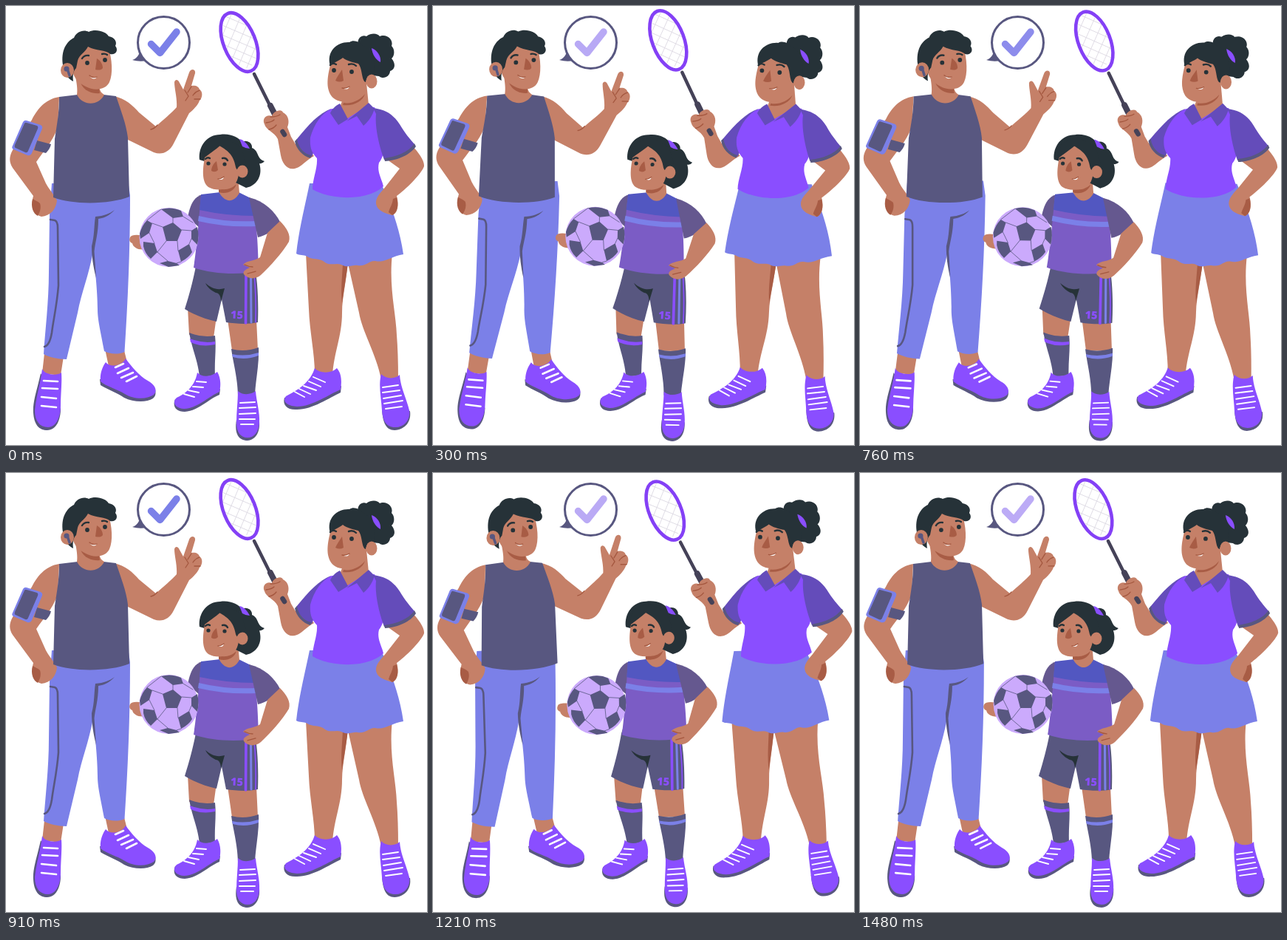
An HTML page for the animation above (1.51 s loop, 570 by 594 pixels).

```html
<!DOCTYPE html>
<html lang="en">
<head>
<meta charset="utf-8">
<title>Sport family</title>
<style>
html, body { margin: 0; width: 100%; height: 100%; overflow: hidden; background: #fff; }
svg { display: block; width: 570px; height: 594px; }
.skin { fill: #c58068; }
.shade { fill: #a85c45; }
.hair { fill: #263238; }
.slate { fill: #585780; }
.violet { fill: #8a4eff; }
.blue { fill: #7b80e8; }
.plum { fill: #644cba; }
.lilac { fill: #cbaafc; }
.line { fill: none; stroke-linecap: round; stroke-linejoin: round; }
.lace { stroke: #fff; stroke-width: 2.6; }
.thin { stroke-width: 1.9; }
.crease { stroke: #a4573f; stroke-width: 1.3; }
.brow { stroke: #263238; stroke-width: 2.4; }
.seam { stroke: #585780; stroke-width: .8; }
</style>
</head>
<body>
<svg viewBox="0 0 570 594">
  <g id="bubble">
    <path class="slate" d="M171,73 C177,71 179,67 181,63 L190,74 C184,75 178,75 171,73Z"/>
    <circle cx="213.500" cy="49.500" r="35" fill="#fff" stroke="#585780" stroke-width="3"/>
    <path id="tick" class="line" stroke-width="9.500" d="M196.500,51.500 L208.500,63.500 L231,35"/>
  </g>

  <g id="manLegs">
    <path class="skin" d="M52,470 L78,474 L74,500 L49,497Z M134,464 L160,466 L164,482 L140,492Z"/>
    <path class="blue" d="M62,240 L165,236 L168,256 C168,330 165,400 160.500,468 C152,472 140,471 133,467 C128,440 124,425 124,410 C124,385 120,350 118,332 C112,365 102,388 97,415 L82,478 C70,478 58,475 51,471 C53,440 58,400 58,360 L59,283Z"/>
    <path class="line" stroke="#585780" stroke-width="2.600" d="M60,289 L66,290 C69,291 70,294 70,300 L71,378 C69,405 64,425 62,442 C60,454 56,460 52,461"/>
    <path class="slate" d="M147,276 C139,285 131,287 125,288 C125,308 121,318 119.500,332 L122,368 C118,352 116,338 116,325 C120,310 119,298 121,285 C133,284 140,281 147,276Z"/>
    <path class="slate" d="M47,497 C42,520 36,535 37,550 C38,567 45,574 56,574 C68,574 74,560 74,545Z"/>
    <path class="violet" d="M49,491 C52,499 69,501 75,496 C76,510 74,525 74,541 C74,556 68,570 57,570 C46,570 39,562 39,547 C41,527 47,510 49,491Z"/>
    <path class="line lace" d="M51,507 L70,508 M49,517 L70,518 M48,529 L68,531 M48,541 L68,543"/>
    <path class="slate" d="M127,505 L128,513 C138,519 150,523 160,530 C172,536 190,537 199,531 C203,528 203,523 202,519Z"/>
    <path class="violet" d="M135,482 C141,490 157,487 162,477 C170,488 180,500 192,507 C203,513 205,521 200,526 C190,533 172,532 161,525 C150,518 136,515 128,508 C127,498 130,489 135,482Z"/>
    <path class="line lace" d="M148,489 L159,484 M151,497 L166,490 M156,503 L172,496 M163,508 L177,501"/>
  </g>

  <g id="manTop">
    <path class="skin" d="M72,123 C53,126 42,140 35,154 L9,195 C4,204 4,211 9,219 L37,257 C33,272 38,283 48,285 C60,284 68,275 69,263 C65,255 58,248 54,240 L41,211 C52,195 62,185 70,165Z"/>
    <path class="shade" d="M36,261 C33,272 37,281 43,284 C46,279 48,273 46,267 C43,264 39,263 36,261Z"/>
    <path class="slate" d="M42,182 L61,187 C60,192 57,196 54,199 L38,195Z"/>
    <path class="blue" d="M28,155 L47,161 Q50,163 49,166 L35,199 Q33,203 29,202 L10,194 Q7,192 9,189 L23,157 Q25,154 28,155Z"/>
    <path class="slate" d="M28,158 L42,162 Q44,163 43,166 L30,196 Q29,199 26,198 L13,192 Q11,191 12,188 L25,159 Q26,157 28,158Z"/>
    <path class="skin" d="M146,122 C162,125 172,135 180,144 L203,163 C214,153 224,145 231,137 C232,125 228,112 228,103 C229,99 233,99 235,104 L240,113 L248,90 C250,84 257,85 256,91 L251,108 C257,107 261,109 262,113 C267,116 266,124 262,128 C260,134 254,140 248,145 L227,186 C221,198 211,202 200,198 L163,180Z"/>
    <path class="line crease" d="M196,167 Q201,166 205,161 M242,114 L247,122 L243,128 M251,109 L246,117 M262,114 Q256,116 253,121 M263,126 L255,126"/>
    <path class="slate" d="M72,123 L97,120 L132,120 L149,122 C155,140 163,160 165,178 L167,258 C140,269 90,269 64,259 L66,180 C69,160 72,145 72,123Z"/>
    <path class="skin" d="M93,90 C96,105 97,113 96,120 C104,136 126,135 133,120 C128,117 127,114 126,108Z"/>
    <path class="shade" d="M101,104 C106,116 118,119 127,118 L126,111Z"/>
    <path class="skin" d="M90,72 C92,58 100,50 120,50 L138,54 C144,72 145,92 140,103 C135,114 119,115 108,109 C98,104 90,96 90,85Z"/>
    <path class="hair" d="M77,80 C74,60 82,48 92,43 C95,35 105,31 112,35 C122,30 136,35 139,41 C147,42 151,49 148,54 C153,60 148,67 141,65 C135,59 122,61 111,55 C107,63 99,66 97,74 L95,84 C91,88 90,94 91,102 C83,98 78,90 77,80Z"/>
    <ellipse class="skin" cx="83" cy="87" rx="9" ry="10"/>
    <path class="line" stroke="#585780" stroke-width="3.500" d="M83,85 L86,94"/>
    <circle class="slate" cx="82" cy="85" r="3.600"/>
    <circle class="hair" cx="110" cy="77" r="2.900"/><circle class="hair" cx="134" cy="73" r="2.900"/>
    <path class="line brow" d="M103,71 Q106,66 112,67 M130,65 Q134,64 137,66"/>
    <path class="shade" d="M123,71 C128,74 131,79 131,84 C129,87 125,87 121,86Z"/>
    <path fill="#fff" d="M113,94 C117,97 120,97 123,96 C122,99 116,100 113,94Z"/>
    <path class="line crease" d="M113,94 Q117,98 123,96"/>
  </g>

  <g id="kidLegs">
    <path class="skin" d="M246,408 L285,420 L281,449 L248,445Z M300,424 L339,424 L341,466 L306,466Z"/>
    <path class="slate" d="M248,442 Q265,449 283,446 C285,465 282,480 283,500 L262,502 C260,480 252,465 248,442Z M305,464 Q323,469 342,462 C343,485 338,505 337,526 L314,526 C313,500 308,485 305,464Z"/>
    <path class="violet" d="M249,450 Q266,457 283,454 L283,458 Q265,462 250,455Z"/>
    <path class="blue" d="M306,471 Q324,475 342,469 L342,473 Q324,480 307,475Z"/>
    <path class="slate" d="M229,532 C225,542 230,549 242,549 C260,548 274,532 289,526 L290,518Z"/>
    <path class="violet" d="M259,496 C265,503 278,502 286,495 C291,503 291,514 289,522 C275,528 258,545 241,545 C228,544 225,536 231,530 C244,524 256,514 259,496Z"/>
    <path class="line lace thin" d="M258,508 L271,509 M253,515 L267,516 M247,520 L261,523 M241,525 L255,529"/>
    <path class="slate" d="M312,560 C309,579 315,588 327,588 C338,587 344,577 343,562Z"/>
    <path class="violet" d="M314,521 C320,527 332,526 338,521 C339,535 344,550 343,564 C342,577 336,584 327,584 C317,584 312,576 312,564 C312,550 314,535 314,521Z"/>
    <path class="line lace thin" d="M317,537 L337,536 M316,544 L338,543 M316,552 L338,551 M316,559 L337,559 M318,566 L335,566"/>
    <path class="slate" d="M260,343 L335,343 C341,370 342,400 341,428 C328,431 311,430 298,428 L292,397 L285,427 C270,424 255,418 242,410 C249,388 254,368 257,352Z"/>
    <path class="hair" d="M270,375 C278,382 286,385 296,382 L291,400 C291,392 288,388 284,388 C278,385 273,381 270,375Z"/>
    <path class="line" stroke-linecap="butt" stroke="#8a4eff" stroke-width="3.600" d="M325,360 L324.500,429"/>
    <path class="line" stroke="#7b80e8" stroke-width="3" d="M331.500,360 L332,428"/>
    <path class="line" stroke="#8a4eff" stroke-width="1.600" d="M336,362 Q339,395 338,428"/>
    <text class="violet" x="304" y="423" font-family="'Open Sans', sans-serif" font-weight="800" font-size="14.500" transform="rotate(3 312 418)">15</text>
  </g>

  <g id="kidTop">
    <path class="skin" d="M190,312 C180,309 170,309 168,313 C166,317 168,320 171,321 C172,327 180,331 190,329Z"/>
    <path fill="#65588f" d="M266,255 C254,258 249,270 246,286 L262,300Z"/>
    <path fill="#7b5cc5" d="M264,256 L290,253 L315,253 L331,260 C338,275 341,310 342,359 C316,364 280,363 254,354 C258,330 261,290 264,256Z"/>
    <path fill="#5257c1" d="M264,255 L290,252 L315,252 L331,260 L337,284 Q298,284 262,276Z"/>
    <path class="blue" d="M261,284 Q298,293 338,291 L339,298 Q298,300 260,291Z"/>
    <path fill="#65588f" d="M329,259 C350,264 364,278 371,292 C362,304 351,311 341,313Z"/>
    <path class="skin" d="M371,291 C380,300 386,310 383,319 C374,334 358,352 345,364 C338,370 328,370 322,363 C320,358 326,356 330,354 L321,350 C326,344 338,345 344,340 L354,307Z"/>
    <path class="line crease" d="M334,353 Q329,353 323,350 M338,359 L327,362"/>
    <g id="ball">
      <circle class="lilac" cx="220.500" cy="313" r="40"/>
      <path class="slate" d="M212,299 L226,293 L238,303 L232,318 L217,318Z M210,275 Q224,271 237,277 L240,285 L226,287Z M181,308 Q184,297 191,290 L198,294 L194,307 L182,315Z M186,319 L201,321 L205,333 L196,342 Q188,335 186,325Z M233,331 L248,322 L252,333 Q247,341 237,346Z M220,353 L208,348 L219,345 L231,348 L235,351Z M259,299 L251,304 L251,315 L259,323 Q262,311 259,299Z"/>
      <path class="line seam" d="M226,293 L226,287 M212,299 L198,294 M217,318 L205,333 M232,318 L233,331 M238,303 L251,304 M240,285 L253,293 M210,275 L191,290 M251,315 L248,322 M205,333 L219,345 M237,346 L231,348 M194,307 L201,321"/>
    </g>
    <path class="skin" d="M288,238 L289,253 C297,267 309,266 316,253 L314,230Z"/>
    <path class="shade" d="M288,247 C297,250 306,247 312,241 C309,251 298,255 288,252Z"/>
    <path class="hair" d="M262,208 C260,190 272,174 290,174 C304,172 315,178 319,184 C328,180 334,187 333,192 C343,196 339,207 350,210 Q347,214 343,213 C348,229 340,243 325,246 L309,238 L285,215Z"/>
    <path class="skin" d="M269,205 C266,222 265,238 274,245 C286,252 305,248 312,238 C318,226 316,208 309,200 L291,188 C283,195 275,200 269,205Z"/>
    <path class="hair" d="M266,206 C275,200 282,196 287,188 C299,195 308,200 311,218 C313,224 316,222 317,216 L325,212 L318,190 L292,176 L272,186Z"/>
    <ellipse class="skin" cx="320" cy="224" rx="7.500" ry="8.500"/>
    <path class="violet" d="M316,180 C322,181 327,187 330,193 Q325,193 320,190Z"/>
    <circle class="hair" cx="274" cy="213" r="2.600"/><circle class="hair" cx="296" cy="214" r="2.600"/>
    <path class="line brow" d="M270,207 Q273,204 276,206 M293,206 Q298,205 300,209"/>
    <path class="shade" d="M285,210 C281,213 278,218 278,223 Q283,226 287,222Z"/>
    <path fill="#fff" d="M287,234 Q291,234 295,231 Q294,237 287,234Z"/>
    <path class="line crease" d="M287,234 Q291,234 295,231"/>
  </g>

  <g id="womanLegs">
    <path class="skin" d="M406,335 L463,335 C463,365 455,392 455,415 C455,447 444,468 442,500 L418,497 C418,470 411,440 410,410Z"/>
    <path class="skin" d="M460,335 L523,335 C518,380 528,415 529,445 Q531,470 531,505 L508,505 C501,470 482,440 478,415Z"/>
    <path class="shade" d="M456,349 L463,349 C460,370 457,388 455,402 C453,385 455,368 456,349Z"/>
    <path class="slate" d="M377,530 C374,540 381,547 394,546 C415,546 438,530 453,523 L454,514Z"/>
    <path class="violet" d="M418,490 C424,497 440,498 448,490 C454,497 455,507 453,519 C438,525 415,542 394,542 C380,541 374,535 379,528 C394,520 412,510 418,490Z"/>
    <path class="line lace thin" d="M416,502 L432,509 M410,508 L426,515 M403,514 L420,520 M397,518 L412,525 M391,522 L404,529"/>
    <path class="slate" d="M509,545 C510,563 514,574 526,574 C541,573 549,562 547,548Z"/>
    <path class="violet" d="M508,498 C514,505 527,505 533,499 C534,516 542,530 546,547 C548,559 540,570 527,570 C514,570 510,560 509,547 C508,530 504,513 508,498Z"/>
    <path class="line lace thin" d="M510,516 L531,513 M510,523 L533,520 M511,531 L535,527 M512,538 L537,534 M514,545 L536,542"/>
    <path class="blue" d="M411,240 C405,270 397,300 393,335 C398,338 402,336 408,339 C415,344 424,340 432,347 C440,352 447,347 454,350 C462,355 470,350 476,351 C488,353 491,344 500,345 C513,348 520,339 538,336 C533,300 521,270 508,240Z"/>
  </g>

  <g id="womanTop">
    <g transform="rotate(-22 316 49)">
      <path class="line" stroke="#dcd8e2" stroke-width=".8" d="M297,30 L334,67 M296,45 L331,80 M299,63 L320,84 M304,20 L337,53 M312,10 L335,33 M335,30 L298,67 M336,45 L302,79 M337,60 L312,85 M328,20 L296,52 M320,10 L297,33"/>
      <ellipse cx="316" cy="49" rx="21.500" ry="42" fill="none" stroke="#8440f6" stroke-width="4.600"/>
    </g>
    <path class="line" stroke="#454258" stroke-width="4.500" d="M336,92 L358,136"/>
    <path class="line" stroke="#454258" stroke-width="8" d="M358,135 L376,170"/>
    <path class="skin" d="M350,160 C346,152 353,146 360,149 C361,143 373,138 375,144 C383,148 384,157 381,164 L386,177 L392,187 L398,180 L417,203 C406,209 400,217 394,219 C382,224 374,214 372,202 L368,180 C363,170 352,168 350,160Z"/>
    <path class="line" stroke="#454258" stroke-width="6.500" d="M374.500,170 L377,174"/>
    <path class="line crease" d="M352,158 Q360,157 363,154 M358,150 Q367,150 371,147 M356,167 Q362,166 366,161"/>
    <path class="plum" d="M440,139 C424,145 410,160 393,181 C396,193 405,201 414,204 L428,170Z"/>
    <path class="slate" d="M394,180 C396,193 405,201 414,202 L412,206 C402,203 393,194 391,183Z"/>
    <path class="skin" d="M512,205 L551,190 C558,198 567,209 566,217 C563,226 545,245 529,257 C532,268 531,280 523,283 C516,281 502,278 501,267 C500,258 510,250 515,243 L533,220Z"/>
    <path class="shade" d="M524,261 L529,259 C532,269 530,280 523,283 L518,279 C520,272 523,269 524,261Z"/>
    <path class="violet" d="M441,139 C427,145 417,160 412,178 C411,192 414,198 421,206 C422,220 415,234 415,248 C440,263 490,264 511,244 C508,232 502,224 505,212 C513,202 512,190 509,175 L499,137Z"/>
    <path class="plum" d="M497,138 C512,140 523,145 533,160 C540,172 547,180 553,187 C545,199 528,206 512,208 C506,192 499,165 501,146Z"/>
    <path class="slate" d="M553,186 C545,198 528,204 512,206 L513,210 C530,209 548,201 555,190Z"/>
    <path class="skin" d="M452,137 L461,153 L491,134 L488,104 L458,120Z"/>
    <path class="shade" d="M457,131 C468,133 480,127 486,119 C483,129 470,136 456,134Z"/>
    <path class="plum" d="M452,132 C446,135 441,140 439,145 L450,161 L463,153Z M491,131 L499,139 C496,149 491,156 484,162 L475,149 L461,156Z"/>
    <path class="hair" d="M478,57 C473,45 481,38 488,41 C495,36 503,37 506,41 C516,37 525,46 522,54 C527,59 526,68 522,71 C528,78 527,86 520,88 C520,95 511,100 505,95 L488,93Z"/>
    <path class="skin" d="M441,72 C436,92 432,108 440,121 C448,132 465,131 475,126 C487,119 490,105 488,90 L480,65 L452,62Z"/>
    <path class="hair" d="M439,81 C433,61 449,48 465,49 C471,45 479,49 482,53 C492,57 497,66 499,78 L500,94 C493,93 488,96 487,103 C481,101 483,85 477,78 C469,76 461,74 456,70 C451,74 444,76 439,81Z"/>
    <ellipse class="skin" cx="495" cy="102" rx="7.500" ry="9.500"/>
    <path class="violet" d="M495,57 C503,60 508,68 507,76 C501,73 496,66 495,57Z"/>
    <circle class="hair" cx="444" cy="87" r="2.900"/><circle class="hair" cx="468" cy="89" r="2.900"/>
    <path class="line brow" d="M439,80 Q442,76 447,79 M464,79 Q470,77 474,81"/>
    <path class="shade" d="M455,86 C451,92 448,96 446,101 Q452,104 457,101Z"/>
    <path fill="#fff" d="M455,111 Q460,112 465,109 Q463,115 455,111Z"/>
    <path class="line crease" d="M455,111 Q460,112 465,109"/>
  </g>
</svg>
<script>
const LOOP = 1510, REST = -0.14;
// time (ms), lean
const LEAN = [[0, REST], [290, .97], [450, 1], [640, .95], [910, REST],
  [1090, -.96], [1210, -1], [1330, -.96], [1480, -.2], [LOOP, REST]];
// part, degrees at full lean, pivot
const PARTS = [
  ["manLegs", 1.2, 120, 390], ["manTop", 1.25, 134, 172],
  ["kidLegs", 1.2, 285, 465], ["kidTop", 1.2, 275, 262],
  ["womanLegs", 1.4, 460, 412], ["womanTop", 1.25, 427, 144]
].map(([id, ...rest]) => [document.getElementById(id), ...rest]);
const tick = document.getElementById("tick");
const DARK = [123, 128, 232], PALE = [204, 182, 249];
const mix = (a, b, k) => a + (b - a) * k;

function lean(t) {
  const i = LEAN.findIndex(p => p[0] > t);
  const [t0, a] = LEAN[i - 1], [t1, b] = LEAN[i];
  return mix(a, b, (t - t0) / (t1 - t0));
}

function draw(t) {
  const s = lean(t) - REST;
  for (const [el, deg, x, y] of PARTS)
    el.setAttribute("transform", `rotate(${(s * deg).toFixed(3)} ${x} ${y})`);
  const k = (1 - Math.cos(t / 900 * 2 * Math.PI)) / 2;
  tick.setAttribute("stroke", `rgb(${DARK.map((c, i) => Math.round(mix(c, PALE[i], k)))})`);
}

const start = performance.now();
function loop() {
  draw((performance.now() - start) % LOOP);
  requestAnimationFrame(loop);
}
draw(0);
requestAnimationFrame(loop);
</script>
</body>
</html>
```
